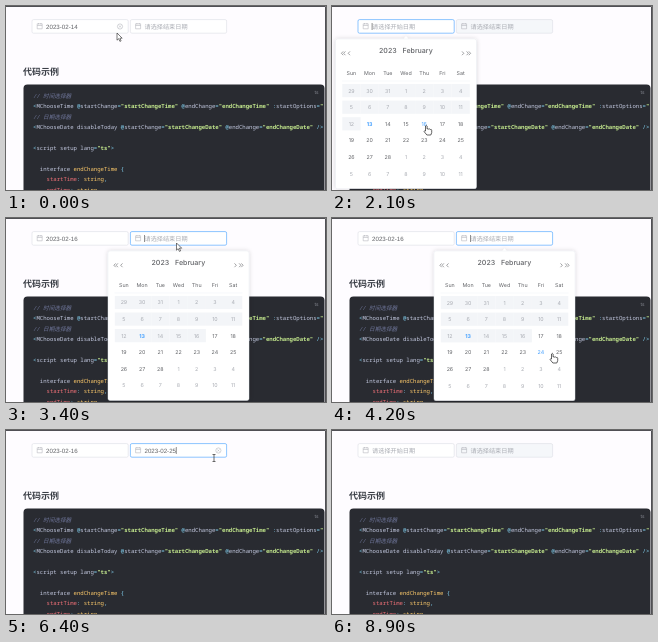
Animation, 320 px wide and 184 px high, one loop 9200 ms. Source, as an HTML page:

```html
<!DOCTYPE html>
<html lang="zh">
<head>
<meta charset="utf-8">
<title>Date picker demo</title>
<style>
html, body { margin: 0; width: 100%; height: 100%; overflow: hidden; background: #fefcff; }
svg { display: block; width: 320px; height: 184px; }
text { white-space: pre; text-rendering: geometricPrecision; }
.ui { font-family: Inter, "Noto Sans CJK SC", sans-serif; }
.input { font-family: "Liberation Sans", "Noto Sans CJK SC", "Noto Sans CJK", sans-serif; }
.code { font-family: "Noto Sans Mono", "Liberation Mono", "Noto Sans CJK SC", monospace; font-weight: 500; }
</style>
</head>
<body>
<svg viewBox="0 0 320 184">
  <defs>
    <filter id="shadow" x="-10%" y="-10%" width="120%" height="120%">
      <feDropShadow dx="0" dy="0" stdDeviation="2" flood-color="#000" flood-opacity=".16"/>
    </filter>
  </defs>
  <g id="page"></g>
  <g id="live"></g>
  <path d="M0 .5H319.5V184" fill="none" stroke="#505055"/>
</svg>
<script>
const LOOP = 9200, STEP = 100;
const BLUE = '#409eff', GREY = '#a8abb2', DARK = '#606266';
const page = document.getElementById('page'), live = document.getElementById('live');

const esc = s => s.replace(/&/g, '&amp;').replace(/</g, '&lt;');
const text = (x, y, s, size, fill, cls, more = '') =>
  `<text class="${cls}" x="${x}" y="${y}" font-size="${size}" fill="${fill}" ${more}>${s}</text>`;
const line = (d, color, width = .5) =>
  `<path d="${d}" fill="none" stroke="${color}" stroke-width="${width}"/>`;
const clamp = v => Math.max(0, Math.min(1, v));
const within = (t, a, b) => t >= a && t < b;
const easeOut = ms => 1 - (1 - clamp(ms / 300)) ** 5;

// Static page: heading and code block
const code = [
  '// 时间选择器',
  '<MChooseTime @startChange="startChangeTime" @endChange="endChangeTime" :startOptions="',
  '// 日期选择器',
  '<MChooseDate disableToday @startChange="startChangeDate" @endChange="endChangeDate" />',
  '',
  '<script setup lang="ts">',
  '',
  '  interface endChangeTime {',
  '    startTime: string,',
  '    endTime: string,'
];
function tokenColor(token, row) {
  if (token[0] === '"') return '#c3e88d';
  if (/^\W/.test(token)) return '#89ddff';
  if (row < 7 || token === 'interface') return '#c5cbe2';
  return row === 7 || token === 'string' ? '#ffcb6b' : '#f07178';
}
function codeLine(s, row) {
  const y = 92 + row * 10.4;
  if (s.startsWith('//')) return text(27, y, s, 5.62, '#70779c', 'code', 'font-style="italic"');
  const spans = s.replace(/"[^"]*"?|\w+|[^\w\s"]+|\s+/g, token =>
    `<tspan fill="${tokenColor(token, row)}" font-weight="${token[0] === '"' ? 600 : 500}">${esc(token)}</tspan>`);
  return text(27, y, spans, 5.64, '#c5cbe2', 'code');
}
page.innerHTML = '<rect width="320" height="184" fill="#fefcff"/>' +
  text(17, 69, '代码示例', 9, '#3a3e46', 'ui', 'font-weight="700"') +
  '<rect x="17.5" y="78.6" width="301" height="130" rx="4" fill="#292b31"/>' +
  text(308.5, 87.5, 'ts', 4.8, '#80838c', 'ui') +
  code.map(codeLine).join('');

// Input field
function field(x, f) {
  const cx = x + 88, ix = x + 5.2;
  const color = f.focus ? BLUE : '#dcdee5';
  let out = `<rect x="${x}" y="13.6" width="96.2" height="13.6" rx="1.5" fill="${f.off ? '#f5f7fa' : '#fff'}" stroke="${color}" stroke-width=".6"/>` +
    line(`M${ix} 17.8h5v5h-5zM${ix} 19.5h5M${ix + 1.3} 17v1.4M${ix + 3.7} 17v1.4`, GREY) +
    text(x + 14.1, 22.8, f.value || f.hint, 6.17, f.value ? DARK : GREY, 'input');
  if (f.caret) out += line(`M${x + 14.1 + (f.value ? 31.8 : 0)} 17v7`, '#444', .6);
  if (f.clear) out += `<circle cx="${cx}" cy="20.5" r="2.6" fill="none" stroke="${GREY}" stroke-width=".5"/>` +
    line(`M${cx - 1} 19.5l2 2m0-2l-2 2`, GREY);
  return out;
}

// Calendar drop-down; cells before firstFree are disabled
function calendar(cx, p) {
  if (p.shown < .01) return '';
  const dx = 18.2, left = cx - 70.5;
  const colX = c => cx + (c - 3) * dx;
  let out = `<g filter="url(#shadow)"><path d="M${cx - 2.5} 33.2l2.5-2.7 2.5 2.7z" fill="#fff"/>` +
    `<rect x="${left}" y="33" width="141" height="149.8" rx="2" fill="#fff" stroke="#e4e7ed" stroke-width=".4"/></g>` +
    text(cx - 27, 46.6, '2023', 7.06, DARK, 'ui', 'font-weight="500"') +
    text(cx - 3.5, 46.6, 'February', 7.06, DARK, 'ui', 'font-weight="500"');
  for (const side of [-1, 1])
    for (const d of [57, 61.6, 63.8])
      out += line(`M${cx + side * d - side} 45.4l${side * 1.8} 1.9l${-side * 1.8} 1.9`, DARK, .6);
  'Sun Mon Tue Wed Thu Fri Sat'.split(' ').forEach((d, c) =>
    out += text(colX(c), 68.9, d, 5.3, DARK, 'ui', 'text-anchor="middle"'));
  out += line(`M${cx - 64} 75h128`, '#ebeef5', .4);
  for (let i = 0; i < 42; i++) {
    const c = i % 7, y = 84.6 + (i / 7 | 0) * 16.6, x = colX(c);
    const date = i < 3 ? 29 + i : (i - 3) % 28 + 1;
    const inMonth = i > 2 && i < 31, off = i < p.firstFree;
    const chosen = inMonth && date === p.chosen, today = inMonth && date === 13;
    const hot = inMonth && date === p.hover;
    if (off) out += `<rect x="${x - dx / 2}" y="${y - 6.6}" width="${dx + .1}" height="13.2" fill="#f3f5f8"/>`;
    if (chosen) out += `<circle cx="${x}" cy="${y}" r="5.3" fill="${BLUE}"/>`;
    const fill = chosen ? '#fff' : today || hot ? BLUE : off || !inMonth ? GREY : DARK;
    out += text(x, y + 1.9, date, 5.3, fill, 'ui', `text-anchor="middle" font-weight="${today ? 700 : 400}"`);
  }
  return `<g opacity="${p.shown}" transform="translate(0 ${33 * (1 - p.shown)}) scale(1 ${p.shown})">${out}</g>`;
}

// Pointer path: time, x, y, shape from that time on
const route = [
  [0, 111, 27, 'arrow'], [300, 101, 24, 'arrow'], [600, 113, 21, 'hand'], [1000, 114, 21, 'hand'],
  [1100, 118, 26, 'arrow'], [1400, 150, 62, 'arrow'], [1700, 99, 117, 'hand'], [2100, 92, 119, 'hand'],
  [2500, 92, 119, 'arrow'], [2900, 150, 50, 'arrow'], [3100, 170.5, 25, 'beam'], [3400, 170.5, 25, 'arrow'],
  [4000, 212, 130, 'hand'], [4200, 218, 135, 'hand'], [4400, 223, 134, 'hand'], [4600, 223, 134, 'beam'],
  [5000, 223, 134, 'beam'], [5500, 155, 168, 'beam'], [6000, 303, 120, 'beam'], [6400, 208, 28, 'beam'],
  [6700, 150, 23, 'beam'], [6800, 121, 22, 'hand'], [7300, 115, 22, 'hand'], [7700, 115, 22, 'beam'],
  [7900, 115, 22, 'beam'], [8100, 132, 26, 'arrow'], [8300, 132, 26, 'arrow'], [8800, 310, 172, 'arrow'],
  [8900, 340, 200, 'arrow'], [9200, 340, 200, 'arrow']
];
const shapes = {
  arrow: '<path d="M0 0v7.2l1.7-1.5 1.2 2.7 1.2-.5-1.2-2.7h2.3z" fill="#fff" stroke="#222" stroke-width=".6"/>',
  hand: '<path d="M1.5 6V1q.8-1.4 1.6 0v3q1-.8 1.6.2q1-.7 1.6.3q1.2-.5 1.4.7v2.5L6.8 10H2.9L.1 6.6q.2-1.3 1.4-.6z" fill="#fff" stroke="#222" stroke-width=".7"/>',
  beam: '<path d="M-1.5-3.5h3M0-3.5v7M-1.5 3.5h3" fill="none" stroke="#333" stroke-width=".7"/>'
};
function pointer(t) {
  const n = route.findIndex(r => r[0] > t);
  const [t0, x0, y0, shape] = route[n - 1], [t1, x1, y1] = route[n];
  const k = (t - t0) / (t1 - t0), s = k * k * (3 - 2 * k);
  return `<g transform="translate(${x0 + (x1 - x0) * s} ${y0 + (y1 - y0) * s})">${shapes[shape]}</g>`;
}

function draw(t) {
  const startValue = t < 900 ? '2023-02-14' : within(t, 2400, 7500) ? '2023-02-16' : '';
  const endValue = within(t, 4500, 7500) ? '2023-02-25' : '';
  const blink = (from, to) => within(t, from, to) && (t - from) % 1000 < 500;
  const shown = (open, close) => easeOut(t - open) * (1 - easeOut(t - close));
  live.innerHTML =
    field(26, {
      value: startValue, hint: '请选择开始日期',
      focus: within(t, 900, 3250) || within(t, 6750, 8400),
      caret: blink(900, 2400) || blink(6750, 8400),
      clear: t < 900 || within(t, 6800, 7500)
    }) +
    field(124.4, {
      value: endValue, hint: '请选择结束日期', off: !startValue,
      focus: within(t, 3250, 6750), caret: blink(3150, 6750), clear: within(t, 6200, 6700)
    }) +
    calendar(74, {
      shown: shown(900, 2400) + shown(6900, 7500), firstFree: 15,
      chosen: within(t, 2400, 7500) ? 16 : 0, hover: within(t, 1700, 2400) ? 16 : 0
    }) +
    calendar(172.5, {
      shown: shown(3185, 4500), firstFree: 19,
      chosen: t >= 4500 ? 25 : 0, hover: within(t, 4000, 4300) ? 24 : within(t, 4300, 4500) ? 25 : 0
    }) +
    pointer(t);
}

const begin = performance.now();
let last = -1;
function tick() {
  const now = Math.max(0, performance.now() - begin) % LOOP;
  const t = Math.floor(now / STEP) * STEP;
  if (t !== last) draw(last = t);
  requestAnimationFrame(tick);
}
tick();
</script>
</body>
</html>
```
